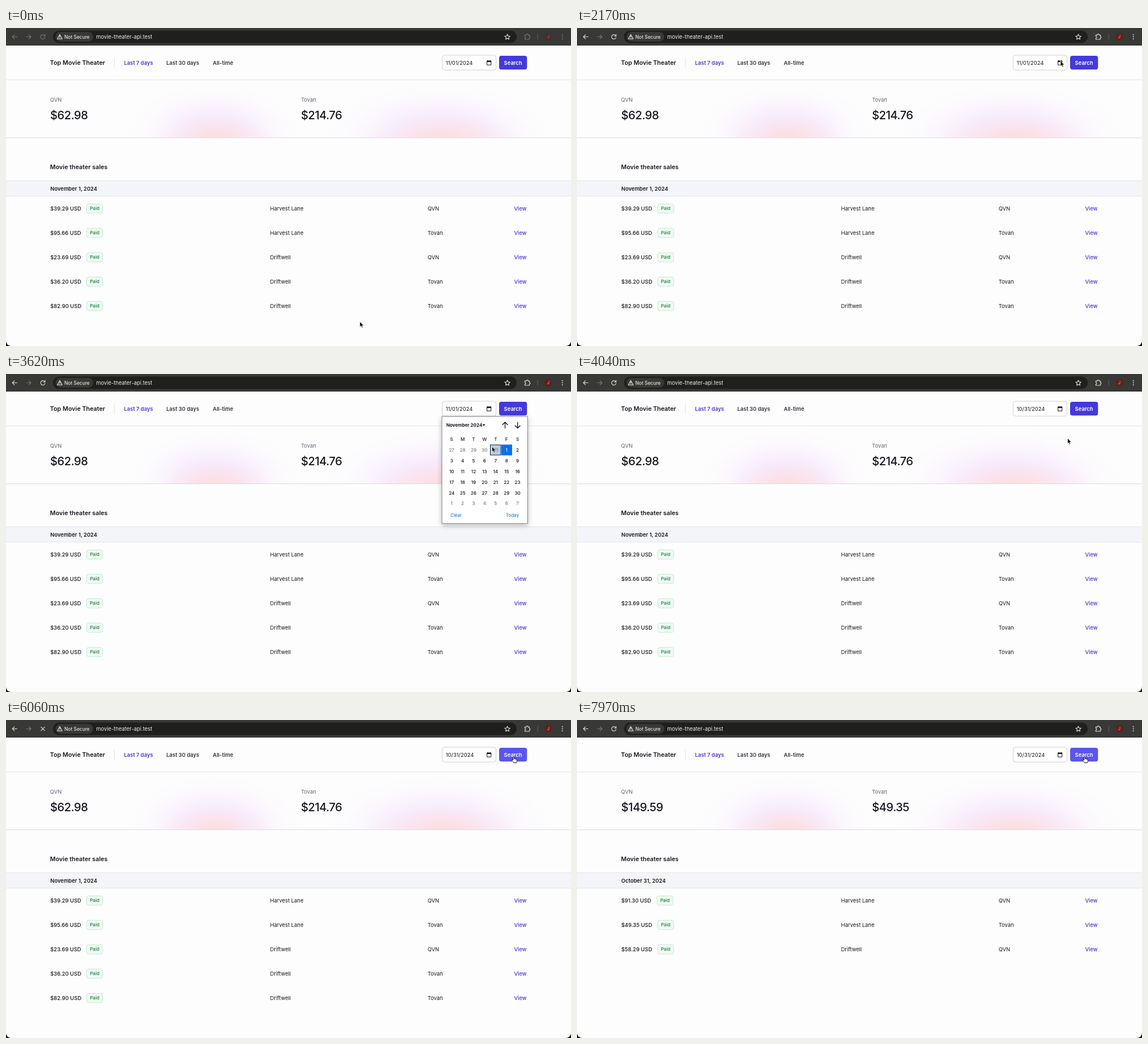
Animation, 998 px wide and 561 px high, one loop 8000 ms. Source, as an HTML page:

```html
<!DOCTYPE html>
<html lang="en">
<head>
<meta charset="utf-8">
<title>Top Movie Theater</title>
<style>
  html, body { margin: 0; width: 100%; height: 100%; overflow: hidden; background: #111; }
  svg { display: block; width: 998px; height: 561px; }
  text { font: 9.41px Inter, Roboto, sans-serif; fill: #16181f; white-space: pre; }
  .line { fill: none; stroke: currentColor; stroke-width: 1.15; stroke-linecap: round; stroke-linejoin: round; }
  #bar { color: #dededb; }
  #bar.idle .live, #bar .off { color: #777773; }
  #bar.idle .avatar { opacity: .45; }
</style>
</head>
<body>
<svg viewBox="0 0 998 561">
  <defs>
    <radialGradient id="lilac">
      <stop offset="0" stop-color="#f3dcfa" stop-opacity=".9"/>
      <stop offset=".45" stop-color="#f5e6fc" stop-opacity=".65"/>
      <stop offset="1" stop-color="#fbf5fe" stop-opacity="0"/>
    </radialGradient>
    <radialGradient id="peach">
      <stop offset="0" stop-color="#fedcda"/>
      <stop offset=".4" stop-color="#fde1e3" stop-opacity=".7"/>
      <stop offset="1" stop-color="#fbe6f0" stop-opacity="0"/>
    </radialGradient>
    <clipPath id="stats"><path d="M0 92h998v102H0z"/></clipPath>
    <filter id="shadow" x="-20%" y="-20%" width="140%" height="140%">
      <feDropShadow dx="0" dy="3" stdDeviation="4" flood-opacity=".28"/>
    </filter>
  </defs>

  <path d="M0 31H998V552a9 9 0 0 1-9 9H9a9 9 0 0 1-9-9z" fill="#fdfdfd"/>
  <g clip-path="url(#stats)">
    <ellipse cx="368" cy="190" rx="150" ry="92" fill="url(#lilac)"/>
    <ellipse cx="765" cy="190" rx="195" ry="92" fill="url(#lilac)"/>
    <ellipse cx="372" cy="198" rx="100" ry="50" fill="url(#peach)"/>
    <ellipse cx="775" cy="198" rx="135" ry="50" fill="url(#peach)"/>
  </g>
  <path d="M0 269.5H998V297H0z" fill="#f4f5f8"/>
  <path d="M0 91.5H998M0 269.5H998M0 296.5H998M191.5 52V70.500" stroke="#e4e4ea"/>
  <path d="M0 193.700H998" stroke="#dcd9e6"/>

  <g id="bar">
    <path d="M0 0H998V31H0z" fill="#383836"/>
    <rect x="83" y="4.500" width="819" height="22" rx="11" fill="#1f1f1e"/>
    <rect x="87.500" y="7" width="66.500" height="17" rx="8.500" fill="#383836"/>
    <path class="line live" d="M19.500 15.500H11.500M15 11.800L11.300 15.500L15 19.200"/>
    <path class="line off" d="M36 15.500H44M40.500 11.800L44.200 15.500L40.500 19.200"/>
    <path id="reload" class="line live" d="M68.600 13.800A3.900 3.900 0 1 0 68.900 16.600M69 11.400V14.200H66.200"/>
    <path id="stop" class="line" d="M61.900 12.300L68.300 18.700M68.300 12.300L61.900 18.700"/>
    <path class="line" d="M95 11.600L99.300 19.200H90.700zM95 14.300V16.300M95 17.700V17.800"/>
    <path class="line" d="M885.600 11l1.400 3 3.300.4-2.500 2.200.7 3.300-2.900-1.700-2.900 1.700.7-3.300-2.500-2.200 3.300-.4z"/>
    <path class="line live" d="M916.500 12.300H919.100a1.600 1.600 0 0 1 3.200 0H924.400V14.800a1.500 1.500 0 0 1 0 3V20H916.500V17.800a1.500 1.500 0 0 0 0-3z"/>
    <path d="M939.200 10.500V20.500" stroke="#66635e"/>
    <g class="avatar">
      <circle cx="958" cy="15.500" r="6.800" fill="#64201a"/>
      <text x="958" y="18.300" text-anchor="middle" style="font-size:7.500px;fill:#f3b9aa">J</text>
    </g>
    <g class="live" fill="currentColor">
      <circle cx="982.700" cy="11.800" r="1"/><circle cx="982.700" cy="15.500" r="1"/><circle cx="982.700" cy="19.200" r="1"/>
    </g>
    <text x="103" y="18.500" style="font-size:8.400px;font-weight:500;fill:#e6e6e3">Not Secure</text>
    <text x="159.300" y="18.800" style="fill:#ececea">movie-theater-api.test</text>
  </g>

  <g id="page"></g>
  <g id="before"></g>
  <g id="after"></g>

  <rect x="770.500" y="48" width="95" height="26.200" rx="4" fill="#fff" stroke="#cfd0d8"/>
  <text id="date" x="776.800" y="64.900"></text>
  <path d="M849.600 58.300H856.700V65.200H849.600z" fill="none" stroke="#111"/>
  <path d="M849.100 57.800h8.100v2.200h-8.100zM850.600 56.800h1.200v1.500h-1.200zM854.500 56.800h1.200v1.500h-1.200z" fill="#111"/>
  <rect id="button" x="871" y="49" width="49.300" height="24.200" rx="4"/>
  <text x="895.600" y="64.700" text-anchor="middle" style="font-weight:600;fill:#fff">Search</text>

  <g id="calendar"></g>

  <path id="arrow" d="M0 0V9.600L2.200 7.600L3.800 11.200L5.400 10.500L3.900 7H6.900z" fill="#000" stroke="#fff" stroke-width=".8"/>
  <path id="hand" d="M-1.300 6.500V.8C-1.300-.5.600-.5.600.8V4.200C.900 3.400 2.200 3.600 2.200 4.500C2.600 3.900 3.700 4.100 3.800 5C4.300 4.400 5.400 4.700 5.400 5.700V8C5.400 9.400 4.500 9.800 4.400 11H-.4C-.7 9.700-2.400 8.300-3.500 6.700C-4.100 5.700-2.900 4.900-2.100 5.700z" fill="#fff" stroke="#000" stroke-width=".9"/>
</svg>

<script>
const $ = id => document.getElementById(id);
const INDIGO = "#4936da";
const HOUSES = ["QVN", "Tovan"], FILMS = ["Harvest Lane", "Driftwell"];

// y is the vertical middle of the capitals
function text(str, x, y, { size = 9.41, weight = 400, fill = "#16181f", anchor = "start", track = 0 } = {}) {
  return `<text x="${x}" y="${y + size * 0.363}" text-anchor="${anchor}" style="font-size:${size}px;` +
    `font-weight:${weight};fill:${fill};letter-spacing:${track}em">${str}</text>`;
}

function sales(totals, day, rows) {
  const big = { size: 20.16, weight: 500, track: -0.025 };
  let out = text(totals[0], 78, 153.5, big) + text(totals[1], 521, 153.5, big) +
    text(day, 78.3, 283.5, { weight: 600 });
  rows.forEach(([amount, film, house, badge = 142.5], i) => {
    const y = 318.5 + 43 * i;
    out += text(`$${amount} USD`, 78.3, y, { weight: 500 }) +
      `<rect x="${badge}" y="${y - 8.2}" width="28.200" height="16.400" rx="3.500" fill="#effcf3" stroke="#c4e9d0"/>` +
      text("Paid", badge + 14.1, y, { size: 8.06, weight: 500, fill: "#1b7a3d", anchor: "middle" }) +
      text(FILMS[film], 466.5, y) + text(HOUSES[house], 744.7, y) +
      text("View", 919.6, y, { weight: 500, fill: INDIGO, anchor: "end" });
  });
  return out;
}

function calendar() {
  const size = 8.06, mid = { size, anchor: "middle", weight: 500 };
  const colX = i => 787.2 + 19.4 * i;
  let out = `<rect x="770" y="75" width="151.300" height="188.700" fill="#fff" stroke="#85858a" filter="url(#shadow)"/>` +
    text("November 2024", 777.7, 90, { size, weight: 700 }) +
    `<path d="M841.500 88.700h5l-2.500 3z"/>` +
    `<path class="line" d="M881.500 95.500V85M877 89.500L881.500 85L886 89.500M903.700 85V95.500M899.200 91L903.700 95.500L908.200 91"/>` +
    `<rect id="hover" x="855.500" y="125" width="18.500" height="18" fill="#b5cbf1"/>` +
    `<rect x="875" y="124.500" width="19" height="19" fill="#0870f4"/>`;
  [..."SMTWTFS"].forEach((d, i) => out += text(d, colX(i), 114.7, mid));
  for (let i = 0; i < 42; i++) {
    const n = i - 4;
    const day = n < 1 ? n + 31 : n > 30 ? n - 30 : n;
    const fill = n === 1 ? "#fff" : day === n ? "#111" : "#777";
    out += text(day, colX(i % 7), 134 + 18.9 * Math.floor(i / 7), { ...mid, fill });
  }
  const link = { size, fill: "#0b70cf" };
  return out + text("Clear", 785, 249.3, link) + text("Today", 906, 249.3, { ...link, anchor: "end" });
}

const nav = { weight: 600, fill: "#30353f" }, label = { fill: "#626673" };
$("page").innerHTML =
  text("Top Movie Theater", 77.8, 61.5, { size: 10.75, weight: 600 }) +
  text("Last 7 days", 208.5, 61.5, { weight: 600, fill: INDIGO }) +
  text("Last 30 days", 283.3, 61.5, nav) + text("All-time", 365.3, 61.5, nav) +
  text(HOUSES[0], 77.8, 126.5, label) + text(HOUSES[1], 521, 126.5, label) +
  text("Movie theater sales", 77.8, 245.5, { size: 10.75, weight: 600 });
$("before").innerHTML = sales(["$62.98", "$214.76"], "November 1, 2024", [
  ["39.29", 0, 0], ["95.66", 0, 1], ["23.69", 1, 0], ["36.20", 1, 1], ["82.90", 1, 1]]);
$("after").innerHTML = sales(["$149.59", "$49.35"], "October 31, 2024", [
  ["91.30", 0, 0, 141.2], ["49.35", 0, 1], ["58.29", 1, 0]]);
$("calendar").innerHTML = calendar();

// pointer stops: time, x, y
const path = [
  [250, 625, 518], [550, 700, 380], [700, 700, 380], [1070, 858, 86], [1500, 854, 58],
  [2700, 854, 58], [3400, 858.5, 128], [3800, 858.5, 128], [4500, 887.5, 74.5],
  [4700, 887.5, 74.5], [5000, 897, 64.5]];

function pointer(t) {
  const i = path.findIndex(p => p[0] > t);
  if (i < 1) return path.at(i).slice(1).map((v, k) => i ? v : path[0][k + 1]);
  const [t0, x0, y0] = path[i - 1], [t1, x1, y1] = path[i];
  const u = (t - t0) / (t1 - t0), e = u * u * (3 - 2 * u);
  return [x0 + (x1 - x0) * e, y0 + (y1 - y0) * e];
}

const show = (id, on) => $(id).style.display = on ? "" : "none";

function draw(now) {
  const t = now % 8000, [x, y] = pointer(t);
  const open = t >= 2620 && t < 3770;
  const loading = t >= 5300 && t < 6500, done = t >= 6500;
  const overButton = !open && x > 871 && x < 920 && y > 49 && y < 73;

  $("bar").classList.toggle("idle", t < 1700);
  show("reload", !loading);
  show("stop", loading);
  show("before", !done);
  show("after", done);
  show("calendar", open);
  show("hover", x > 855 && x < 875 && y > 125 && y < 143);
  $("hover").setAttribute("stroke", t >= 3500 ? "#1b2430" : "none");
  $("date").textContent = t < 3770 ? "11/01/2024" : "10/31/2024";
  $("button").setAttribute("fill", overButton ? "#5a55f0" : "#4439dc");
  show("arrow", !overButton);
  show("hand", overButton);
  for (const id of ["arrow", "hand"]) $(id).setAttribute("transform", `translate(${x} ${y})`);
  requestAnimationFrame(draw);
}
requestAnimationFrame(draw);
</script>
</body>
</html>
```
